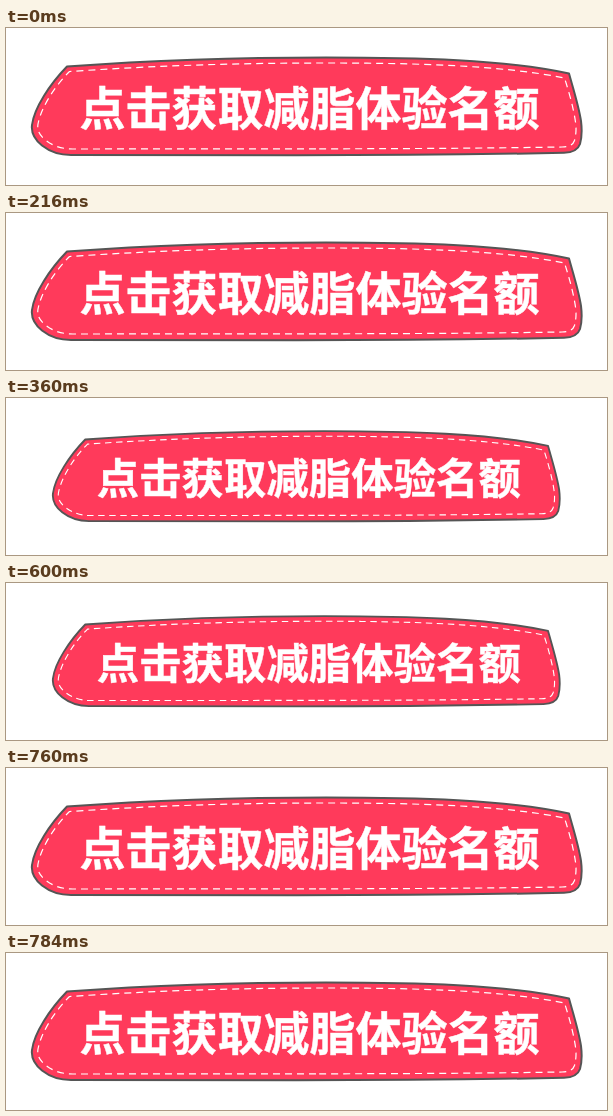
These frames come from a looping animation (601x157 px, 800 ms). An HTML page:

```html
<!DOCTYPE html>
<html lang="zh-CN">
<head>
<meta charset="utf-8">
<style>
  html, body { margin: 0; width: 100%; height: 100%; overflow: hidden; background: #fff; }
  svg { display: block; }
  text {
    font: 700 46px "Noto Sans CJK SC", "Noto Sans CJK", sans-serif;
    fill: #fff; stroke: #fff; stroke-width: .5; text-anchor: middle;
  }
</style>
</head>
<body>
<svg width="601" height="157" viewBox="0 0 601 157">
  <g id="button">
    <path fill="#ff3a5b" stroke="#555" stroke-width="2" stroke-linejoin="round"
      d="M61 38.500 C150 32 235 29.500 320 29.500 C410 29.500 500 31.500 563 45.500
         C567 60 573 79 575 93 C576 101 576 109 574 116 C572 122 567 124.500 558 124.800
         C470 126.500 380 127.300 290 127.300 L65 127 C54 127 43 123 36 117.500
         C28 111 25 105 26 97 C28 80 44 56 61 38.500Z"/>
    <path fill="none" stroke="#fff" stroke-width="1.200" stroke-dasharray="7 5"
      d="M310 120.800 L67 121 C56 121 47 118 40 112.500 C33 107 31 102 32 96
         C35 80 48 59 63.500 43.500 C150 37.500 235 35 320 35 C405 35 495 37 558.500 50
         C563 64 567.500 80 569.500 94 C570.500 101 570 107 568.500 112.500
         C567 117 563 118.800 556 119 C475 120.300 385 120.800 310 120.800"/>
    <text x="303.500" y="97.400">点击获取减脂体验名额</text>
  </g>
</svg>
<script>
  const button = document.getElementById("button");
  const LOOP = 800, SHRINK = 360, GROW = 760;

  function draw(now) {
    const t = now % LOOP;
    const small = t >= SHRINK && t < GROW;
    button.setAttribute("transform", small ? "matrix(.922 0 0 .922 23 6)" : "");
    requestAnimationFrame(draw);
  }
  draw(0);
</script>
</body>
</html>
```
